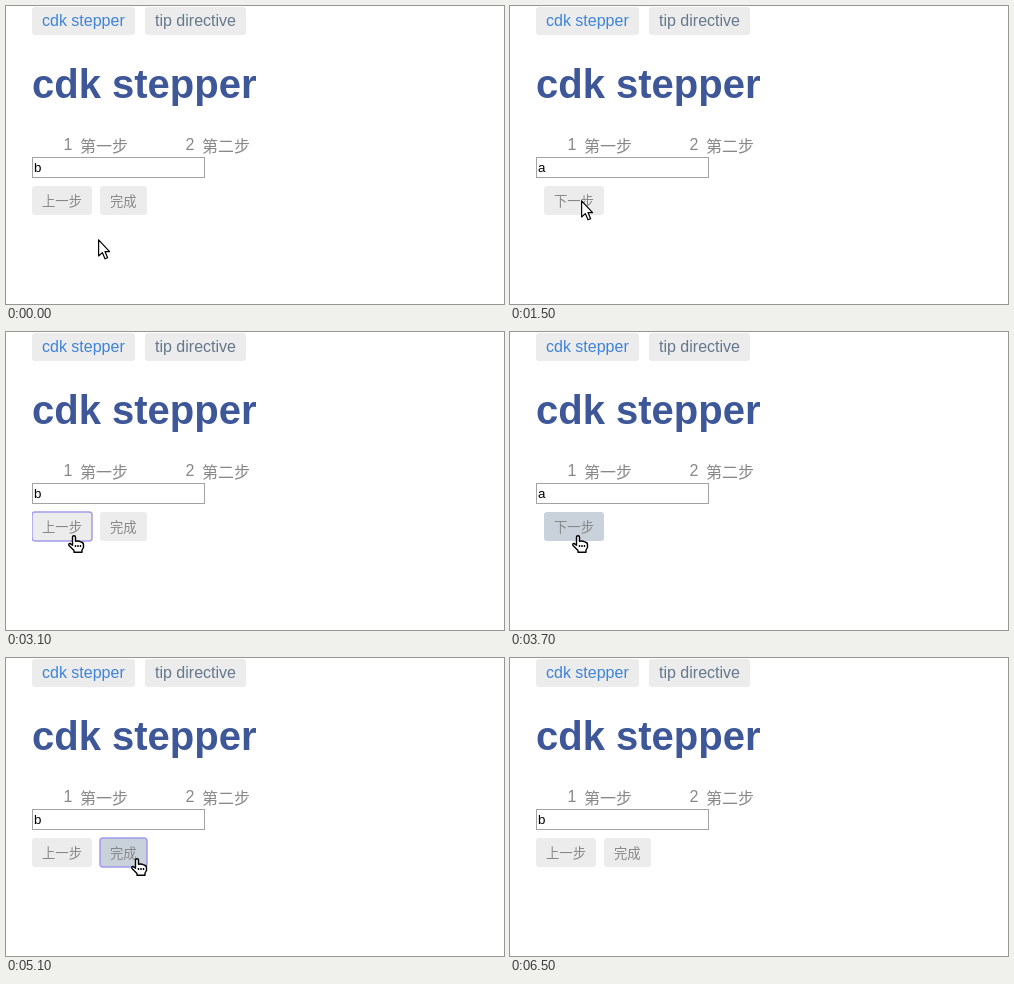
Write an HTML page that moves like this. It is 498x298 px and loops after 6800 ms.

```html
<!DOCTYPE html>
<html lang="zh">
<head>
<meta charset="utf-8">
<title>cdk stepper</title>
<style>
html, body { margin: 0; width: 100%; height: 100%; overflow: hidden; background: #fff; }
svg { display: block; width: 498px; height: 298px; }
text { font: 16px "Liberation Sans", "Noto Sans CJK JP", "Noto Sans CJK", sans-serif; fill: #888; }
.title { font-size: 40px; font-weight: bold; fill: #3e5798; }
.nav { fill: #65788c; }
.nav.on { fill: #3f84d8; }
.btn rect { fill: #ececec; }
.btn text, .field text { font: 13.333px "Liberation Sans", "Noto Sans CJK SC", "Noto Sans CJK", sans-serif; }
.btn.hover rect { fill: #c9d2da; }
.btn.focus rect { stroke: #a09cec; stroke-width: 1.5; }
.field rect { fill: #fff; stroke: #a3a3a3; }
.field text { fill: #000; }
.cursor { fill: #fff; stroke: #000; stroke-width: 1.2; stroke-linejoin: round; }
#hand { stroke-width: 1.4; }
</style>
</head>
<body>
<svg viewBox="0 0 498 298">
  <defs><clipPath id="view"><rect x="26" y="140" width="472" height="158"/></clipPath></defs>

  <g class="btn" id="link"><rect x="26" y="1" width="103" height="28" rx="3"/></g>
  <g class="btn"><rect x="139" y="1" width="101" height="28" rx="3"/></g>
  <text class="nav on" x="36" y="20">cdk stepper</text>
  <text class="nav" x="149" y="20">tip directive</text>
  <text class="title" x="26" y="92">cdk stepper</text>

  <text x="57.5" y="144">1</text><text x="74" y="146">第一步</text>
  <text x="179.5" y="144">2</text><text x="196" y="146">第二步</text>

  <g clip-path="url(#view)">
    <g id="a">
      <g class="field"><rect x="26.5" y="151.5" width="172" height="20"/><text x="28" y="166">a</text></g>
      <g class="btn" id="next"><rect x="34" y="180" width="60" height="29" rx="3"/><text x="44" y="200">下一步</text></g>
    </g>
    <g id="b">
      <g class="field"><rect x="26.5" y="151.5" width="172" height="20"/><text x="28" y="166">b</text></g>
      <g class="btn" id="prev"><rect x="26" y="180" width="60" height="29" rx="3"/><text x="36" y="200">上一步</text></g>
      <g class="btn" id="done"><rect x="94" y="180" width="47" height="29" rx="3"/><text x="104" y="200">完成</text></g>
    </g>
  </g>

  <path class="cursor" id="arrow" d="M.6 .8V17L4.3 13.6 7 19.8 9.6 18.7 7 12.6H11.6Z"/>
  <path class="cursor" id="hand" d="M-.5 2.2Q-.5.7 1 .7T2.5 2.2V6.2Q5.5 5.6 8 7 10.5 7.4 10.5 9.8V12.5L9 15V17.3H1V15.4L-4 10.6Q-4.8 8.6-3 8.4L-.5 10.2ZM2.5 10v2M5 10v2M7.5 10v2"/>
</svg>
<script>
const LOOP = 6800, STEP = 100, SLIDE = 500, WIDTH = 1187;
const PRESS = 100;    // focus shows this long before a slide
const STALE = 90;     // the hand lingers after its button is gone
const SETTLE = 525;   // buttons react again this long after a slide starts
const DONE_FROM = 5100, DONE_TO = 6500;

// Each slide swaps panels; even ones bring in b from the right, odd ones a from the left.
const slides = [-1000, 995, 2171, 3105, 4035];

// Pointer moves: start, end, target x, target y
const home = [92, 233];
const moves = [
  [100, 600, 71, 194],
  [2200, 2400, 76, 207],
  [2400, 2800, 67, 203],
  [4100, 4400, 110, 215],
  [4500, 4800, 130, 200],
  [5400, 6200, 92, -48]
];

const $ = id => document.getElementById(id);
const buttons = ['link', 'next', 'prev', 'done'].map($);
const show = (el, on) => el.style.display = on ? '' : 'none';
const move = (el, x, y) => el.setAttribute('transform', `translate(${Math.round(x)} ${Math.round(y)})`);

// cubic-bezier(.35, 0, .25, 1), solved by bisection
function ease(u) {
  if (u >= 1) return 1;
  let lo = 0, hi = 1, s;
  for (let i = 0; i < 24; i++) {
    s = (lo + hi) / 2;
    const x = 1.05 * s * (1 - s) ** 2 + 0.75 * s * s * (1 - s) + s ** 3;
    if (x < u) lo = s; else hi = s;
  }
  return s * s * (3 - 2 * s);
}

function pointerAt(t) {
  let [x, y] = home;
  for (const [from, to, tx, ty] of moves) {
    const k = Math.min(1, Math.max(0, (t - from) / (to - from)));
    x += (tx - x) * k;
    y += (ty - y) * k;
  }
  return [x, y];
}

function hit(button, x, y) {
  const r = button.firstElementChild.getBoundingClientRect();
  return x >= r.left && x < r.right && y >= r.top && y < r.bottom;
}

function draw(t) {
  const turn = slides.filter(start => start <= t).length - 1;
  const age = t - slides[turn], onB = turn % 2 === 0;
  show($('a'), !onB);
  show($('b'), onB);
  move($(onB ? 'b' : 'a'), (onB ? 1 : -1) * WIDTH * (1 - ease(age / SLIDE)), 0);

  const [x, y] = pointerAt(t);
  const over = age > SETTLE && buttons.find(button => hit(button, x, y));
  const pressed = slides[turn + 1] - t <= PRESS ? $(onB ? 'prev' : 'next')
    : t >= DONE_FROM && t < DONE_TO ? $('done') : null;
  for (const button of buttons) {
    button.classList.toggle('hover', button === over);
    button.classList.toggle('focus', button === pressed);
  }

  const isHand = Boolean(over) || age < STALE;
  show($('hand'), isHand);
  show($('arrow'), !isHand);
  move($(isHand ? 'hand' : 'arrow'), x, y);
}

const begin = performance.now();
function tick() {
  const t = (performance.now() - begin) % LOOP;
  draw(Math.floor(t / STEP) * STEP);
  requestAnimationFrame(tick);
}
tick();
</script>
</body>
</html>
```
